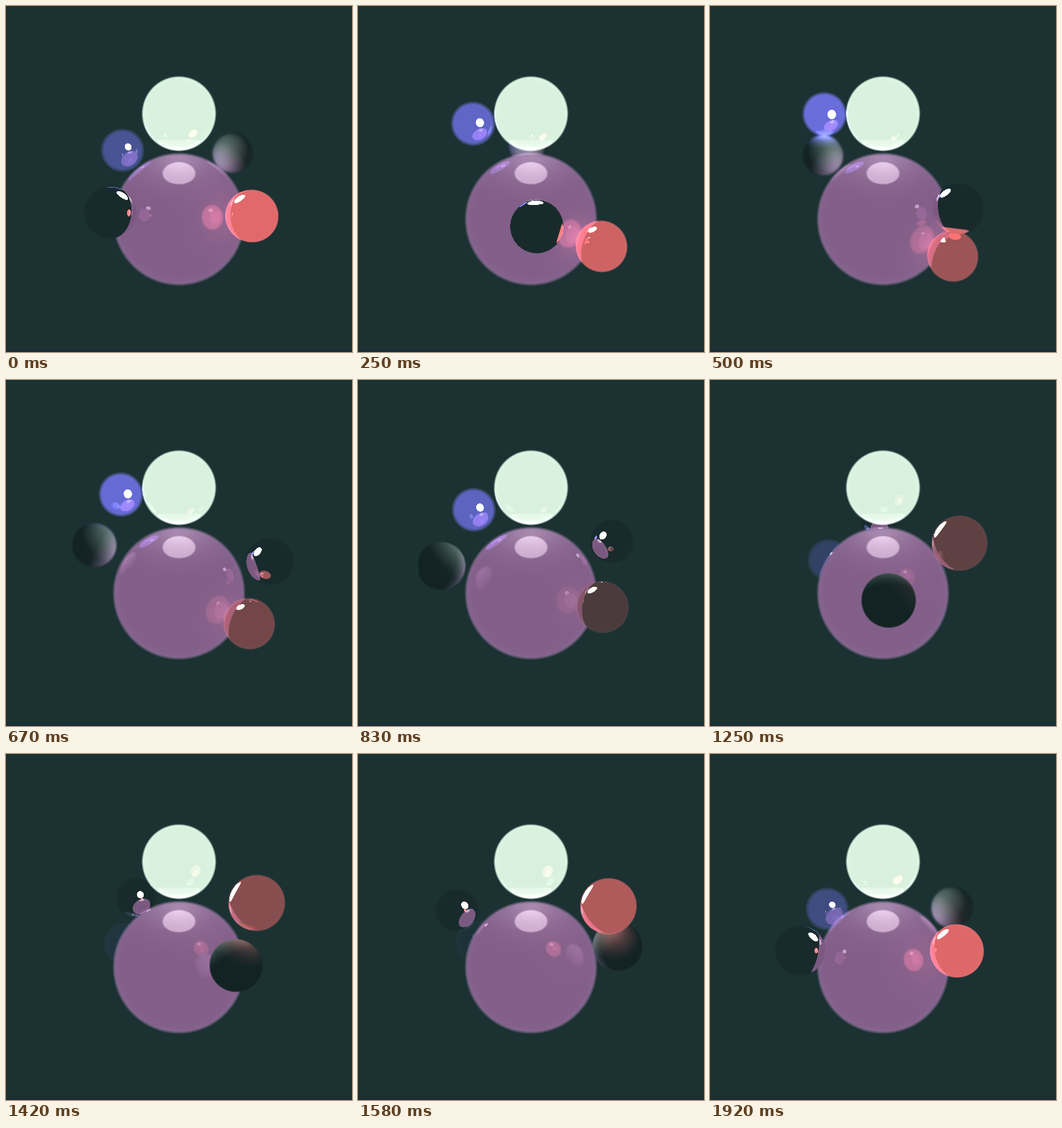
These frames come from a looping animation (480 px wide and 480 px high, 2.01 s). An HTML page with a canvas:

```html
<!DOCTYPE html>
<html lang="en">
<head>
<meta charset="utf-8">
<title>Orbiting spheres</title>
<style>
  html, body { margin: 0; height: 100%; overflow: hidden; background: rgb(28, 49, 50); }
  canvas { display: block; width: 100vw; height: 100vh; }
</style>
</head>
<body>
<canvas id="stage" width="480" height="480"></canvas>
<script>
const SIZE = 480, STEPS = 24, LOOP = 2010;
const FOCAL = 660, FOCUS = 570, PITCH = 26.1 * Math.PI / 180;
const BG = [28, 49, 50], ENV = [25, 45, 46];
const BOX = { x0: 84, x1: 408, y0: 90, y1: 394 };
const MAX_BOUNCE = 2;

const sinP = Math.sin(PITCH), cosP = Math.cos(PITCH);
const eye = [0, FOCAL * sinP, FOCAL * cosP];
const ctx = document.getElementById('stage').getContext('2d');

const deg = a => a * Math.PI / 180;
const dot = (a, b) => a[0] * b[0] + a[1] * b[1] + a[2] * b[2];
const sub = (a, b) => [a[0] - b[0], a[1] - b[1], a[2] - b[2]];
const along = (o, d, t) => [o[0] + d[0] * t, o[1] + d[1] * t, o[2] + d[2] * t];
const unit = v => {
  const l = Math.hypot(v[0], v[1], v[2]);
  return [v[0] / l, v[1] / l, v[2] / l];
};

// gloss: mirror strength, matte: response to nearby glow, boost: glow strength beyond display white
function sphere(center, r, color, look) {
  const s = { center, r, color, gloss: 0, matte: 0, boost: 0, ...look };
  const depth = FOCAL - center[1] * sinP - center[2] * cosP;
  s.edge = (0.7 + Math.abs(depth - FOCUS) * 0.011) * depth / FOCAL;
  return s;
}

const pulse = angle => Math.pow(0.5 + 0.5 * Math.cos(deg(angle)), 0.7);
const glow = (base, add, e) => base.map((b, i) => b + add[i] * e);

function buildScene(step) {
  const turn = deg(15 * (step - 2.8));
  const ox = 124 * Math.sin(turn), oz = 124 * Math.cos(turn);
  const swing = 15 * (step - 15) - 40.6 + 5 * Math.cos(deg(15 * (step - 23)));
  const lift = 8 + 70 * Math.cos(deg(swing));
  const red = glow([36, 28, 29], [176, 54, 53], pulse(15 * step));
  const blue = glow([14, 25, 27], [78, 62, 168], pulse(15 * (step - 6.3)));
  return [
    sphere([0, 94, 0], 47.5, [214, 235, 216], { gloss: 0.12, boost: 1.9 }),
    sphere([0, -63.5, 0], 93.5, [126, 87, 128], { gloss: 0.17, matte: 0.16, boost: 1 }),
    sphere([88, lift, 95], 31.6, red, { gloss: 0.5, boost: 1.5 }),
    sphere([-88, -lift, -95], 31.6, blue, { gloss: 0.5, boost: 1.5 }),
    sphere([ox, 0, oz], 31.2, [0, 0, 0], { gloss: 0.94 }),
    sphere([-ox, 0, -oz], 31.2, [19, 35, 36], { matte: 1.1 })
  ];
}

function addGlow(scene, s, p, n, out) {
  for (const g of scene) {
    if (g === s || !g.boost) continue;
    const v = sub(g.center, p), d2 = dot(v, v);
    const cos = dot(v, n) / Math.sqrt(d2);
    if (cos <= 0) continue;
    const k = s.matte * g.boost * cos * g.r * g.r / d2;
    for (let i = 0; i < 3; i++) out[i] += g.color[i] * k;
  }
}

function shade(scene, s, p, d, bounce) {
  const n = unit(sub(p, s.center));
  const gain = bounce && s.boost ? s.boost : 1;
  const out = [s.color[0] * gain, s.color[1] * gain, s.color[2] * gain];
  if (s.matte) addGlow(scene, s, p, n, out);
  if (s.gloss) {
    const cos = Math.min(0, dot(n, d));
    const rim = Math.pow(1 + cos, 5) * 0.6 * (1 - s.gloss);
    const seen = bounce < MAX_BOUNCE
      ? trace(scene, p, along(d, n, -2 * cos), s, bounce + 1)
      : ENV;
    for (let i = 0; i < 3; i++) out[i] += seen[i] * (s.gloss + rim);
  }
  return out;
}

// Layers every sphere along the ray, front to back, with soft outlines.
function trace(scene, o, d, self, bounce) {
  const hits = [];
  for (const s of scene) {
    if (s === self) continue;
    const v = sub(s.center, o), mid = dot(v, d);
    if (mid <= 0) continue;
    const miss2 = Math.max(0, dot(v, v) - mid * mid);
    const soft = bounce ? 3 : s.edge;
    const cover = 0.5 + (s.r - Math.sqrt(miss2)) / (2 * soft);
    if (cover <= 0) continue;
    const t = mid - Math.sqrt(Math.max(0, s.r * s.r - miss2));
    hits.push({ s, t, cover: Math.min(1, cover) });
  }
  const sky = bounce ? ENV : BG;
  if (!hits.length) return sky;
  if (hits.length > 1) hits.sort((a, b) => a.t - b.t);

  const out = [0, 0, 0];
  let left = 1;
  for (const h of hits) {
    const c = shade(scene, h.s, along(o, d, h.t), d, bounce);
    const w = left * h.cover;
    for (let i = 0; i < 3; i++) out[i] += c[i] * w;
    left -= w;
    if (left < 0.01) return out;
  }
  for (let i = 0; i < 3; i++) out[i] += sky[i] * left;
  return out;
}

function render(step) {
  const scene = buildScene(step);
  const w = BOX.x1 - BOX.x0, h = BOX.y1 - BOX.y0;
  const img = ctx.createImageData(w, h);
  let k = 0;
  for (let py = BOX.y0; py < BOX.y1; py++) {
    const up = SIZE / 2 - py - 0.5;
    for (let px = BOX.x0; px < BOX.x1; px++) {
      const ray = unit([
        px + 0.5 - SIZE / 2,
        up * cosP - FOCAL * sinP,
        -up * sinP - FOCAL * cosP
      ]);
      const c = trace(scene, eye, ray, null, 0);
      img.data[k++] = c[0];
      img.data[k++] = c[1];
      img.data[k++] = c[2];
      img.data[k++] = 255;
    }
  }
  return img;
}

const cache = [];
const start = performance.now();
let shown = -1;

function stepAt(time) {
  let step = STEPS - 1;
  while (step && Math.round(step * 25 / 3) * 10 > time) step--;
  return step;
}

function tick() {
  const step = stepAt((performance.now() - start) % LOOP);
  if (step !== shown) {
    cache[step] = cache[step] || render(step);
    ctx.putImageData(cache[step], BOX.x0, BOX.y0);
    shown = step;
  }
  requestAnimationFrame(tick);
}

ctx.fillStyle = `rgb(${BG})`;
ctx.fillRect(0, 0, SIZE, SIZE);
ctx.fillStyle = 'rgb(26, 42, 52)';
ctx.fillRect(0, SIZE - 2, SIZE, 2);
tick();
</script>
</body>
</html>
```
